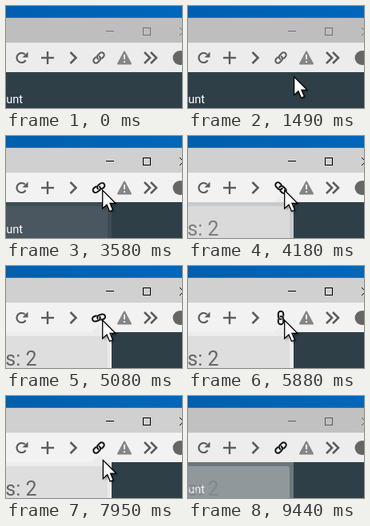
An HTML page with a canvas for the animation above (9540 ms loop, 220 px wide and 128 px high).

```html
<!DOCTYPE html>
<html lang="en">
<head>
<meta charset="utf-8">
<title>Toolbar popup</title>
<style>
html, body { margin: 0; width: 100%; height: 100%; overflow: hidden; }
canvas { display: block; width: 220px; height: 128px; }
</style>
</head>
<body>
<canvas id="stage" width="220" height="128"></canvas>
<script>
const LOOP = 9540;
const ctx = document.getElementById('stage').getContext('2d');
const GRAY = '#5c5c5c';

const clamp = v => Math.max(0, Math.min(1, v));
const span = (t, from, to) => clamp((t - from) / (to - from));
const smooth = p => p * p * (3 - 2 * p);
const mix = (a, b, p) => a + (b - a) * p;
const shade = (a, b, p) => {
  const v = Math.round(mix(a, b, p));
  return `rgb(${v},${v},${v})`;
};
const bezier = (a, b, c, p) => mix(mix(a, b, p), mix(b, c, p), p);

function rect(color, x, y, w, h) {
  ctx.fillStyle = color;
  ctx.fillRect(x, y, w, h);
}

function trace(points, close) {
  ctx.beginPath();
  points.forEach(([x, y]) => ctx.lineTo(x, y));
  if (close) ctx.closePath();
}

function line(points, color, width) {
  trace(points);
  ctx.strokeStyle = color;
  ctx.lineWidth = width;
  ctx.stroke();
}

function label(text, x, y, size, color) {
  ctx.font = `${size}px Roboto, sans-serif`;
  ctx.textAlign = 'right';
  ctx.fillStyle = color;
  ctx.fillText(text, x, y);
}

function drawFrame(active) {
  const sky = ctx.createLinearGradient(0, 0, 220, 0);
  sky.addColorStop(0, '#005fae');
  sky.addColorStop(1, '#0067bb');
  rect(sky, 0, 0, 220, 14);
  rect('#3b6c96', 0, 14, 220, 1);
  rect(shade(190, 208, active), 0, 15, 220, 31);
  rect(shade(236, 242, active), 0, 46, 220, 37);

  const control = shade(112, 0, active);
  line([[125, 31.5], [135, 31.5]], control, 1);
  ctx.strokeRect(171.5, 27.5, 9, 9);
  line([[217, 27], [227, 37]], control, 1);
  line([[217, 37], [227, 27]], control, 1);
}

function drawIcons() {
  ctx.beginPath();
  ctx.arc(19.5, 65, 6, 0.55, 5.5);
  ctx.strokeStyle = GRAY;
  ctx.lineWidth = 2.2;
  ctx.stroke();
  trace([[27.5, 57.5], [27.5, 64.5], [20.5, 64.5]], true);
  ctx.fillStyle = GRAY;
  ctx.fill();

  line([[44, 65], [60, 65]], GRAY, 2.4);
  line([[52, 57], [52, 73]], GRAY, 2.4);
  for (const x of [80.5, 173, 181]) {
    line([[x, 58], [x + 7, 65], [x, 72]], GRAY, 2.6);
  }

  trace([[148, 57.5], [156, 72.5], [140, 72.5]], true);
  ctx.fillStyle = ctx.strokeStyle = '#858585';
  ctx.lineJoin = 'round';
  ctx.lineWidth = 2;
  ctx.fill();
  ctx.stroke();
  ctx.lineJoin = 'miter';
  rect('#eee', 147, 61, 2, 6);
  rect('#eee', 147, 69, 2, 2);

  ctx.beginPath();
  ctx.arc(217.5, 65, 9, 0, 7);
  ctx.fillStyle = '#666';
  ctx.fill();
}

function drawLink(angle, color) {
  ctx.save();
  ctx.translate(116, 65);
  ctx.rotate(angle - Math.PI / 4);
  ctx.strokeStyle = color;
  ctx.lineWidth = 2;
  for (let side = 0; side < 2; side++) {
    ctx.beginPath();
    ctx.moveTo(1.5, 3.2);
    ctx.arc(5, 0, 3.2, Math.PI / 2, -Math.PI / 2, true);
    ctx.lineTo(1.5, -3.2);
    ctx.arc(1.5, 0, 3.2, -Math.PI / 2, -Math.PI * 1.15, true);
    ctx.stroke();
    ctx.rotate(Math.PI);
  }
  ctx.restore();
}

function drawPopup(alpha) {
  ctx.globalAlpha = alpha;
  trace([[-2, 83], [107, 83], [116, 74], [125, 83], [132, 83], [132, 130], [-2, 130]], true);
  ctx.fillStyle = '#ececec';
  ctx.fill();
  ctx.beginPath();
  ctx.roundRect(-10, 88, 137, 50, 4);
  ctx.fillStyle = '#dedede';
  ctx.fill();
  label('s: 2', 38.5, 125, 25, '#666');
  ctx.globalAlpha = 1;
}

function drawPointer(x, y, scale) {
  ctx.save();
  ctx.translate(x, y);
  ctx.scale(scale, scale);
  trace([[0.7, 1], [0.7, 24], [6, 19], [9.5, 27.5], [13.5, 25.8], [10, 17.5], [17, 17.5]], true);
  ctx.shadowColor = 'rgba(0,0,0,.4)';
  ctx.shadowBlur = 3;
  ctx.shadowOffsetX = ctx.shadowOffsetY = 2;
  ctx.fillStyle = '#fff';
  ctx.fill();
  ctx.shadowColor = 'transparent';
  ctx.strokeStyle = '#000';
  ctx.lineWidth = 1.3;
  ctx.stroke();
  ctx.restore();
}

function render(t) {
  const leave = span(t, 9020, 9540);
  const active = smooth(span(t, 2760, 3580)) * (1 - leave);
  const popup = smooth(span(t, 3400, 4480)) * (1 - smooth(leave) * 0.75);
  const hover = span(t, 2000, 2390);
  const turn = span(t, 3500, 7580) * Math.PI * 3;

  drawFrame(active);
  rect('#2f3f48', 0, 83, 220, 45);
  label('ount', 21, 122, 14.5, '#fff');
  drawIcons();
  drawPopup(popup);
  drawLink(turn, shade(92, 20, hover));

  if (t >= 430 && t < 8700) {
    const enter = span(t, 430, 2390);
    const exit = span(t, 7800, 8700);
    const press = 1 - 0.1 * Math.sin(Math.PI * span(t, 2400, 2700));
    const x = bezier(120, 144, 120, enter) + 4 * exit;
    const y = bezier(128, 83, 67, enter) + 63 * Math.pow(exit, 0.9);
    drawPointer(x, y, press);
  }
}

function tick() {
  render(performance.now() % LOOP);
  requestAnimationFrame(tick);
}
tick();
</script>
</body>
</html>
```
